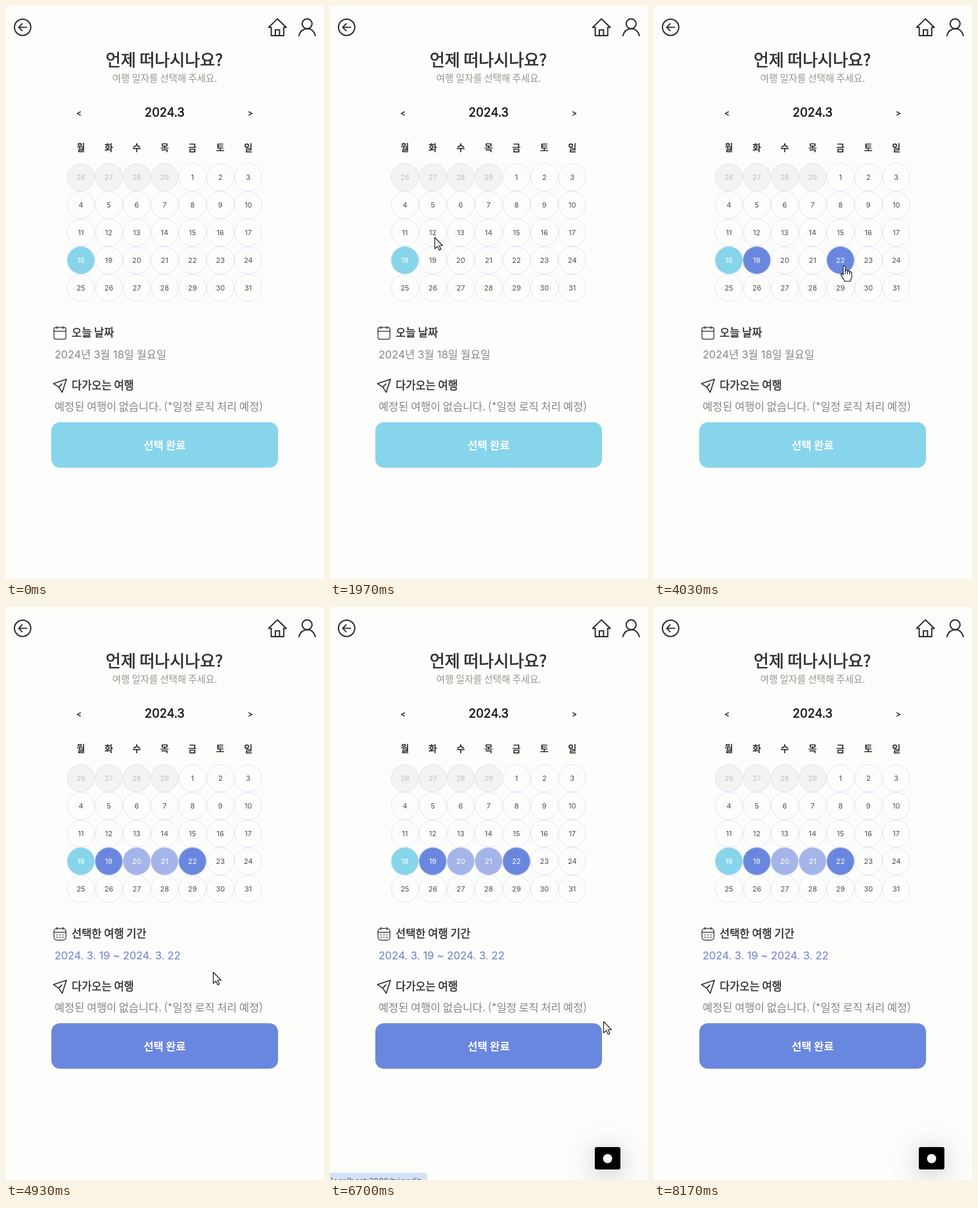
Recreate the animation shown at these times as an HTML page with a canvas. Size 484 by 870 pixels, loop 8210 ms.

```html
<!DOCTYPE html>
<html lang="ko">
<head>
<meta charset="utf-8">
<title>여행 일자 선택</title>
<style>
html, body { margin: 0; width: 100%; height: 100%; overflow: hidden; background: #fdfdfc; }
canvas { display: block; }
</style>
</head>
<body>
<canvas id="stage" width="484" height="870"></canvas>
<script>
const ctx = document.getElementById('stage').getContext('2d');
const LOOP = 8210;
const PICK_START = 2740, PICK_END = 3990, RANGE_SHOWN = 4080;
const BADGE_IN = 6230, STATUS_IN = 6350, STATUS_OUT = 7250;

const KR = '"Noto Sans CJK KR", "Noto Sans CJK", sans-serif';
const MIX = 'Inter, "Noto Sans CJK KR", "Noto Sans CJK", sans-serif';
const BG = '#fdfdfc', INK = '#2e2e2e', MUTED = '#868682';
const SKY = '#87d5eb', BLUE = '#6a87e0', RANGE = '#a4b5ea';

// Pointer stops: time, x, y
const path = [
  [450, 496, 452], [1300, 236, 372], [1970, 159, 351], [2600, 168, 390],
  [2950, 168, 390], [3800, 289, 394], [4250, 289, 394], [5450, 332, 661],
  [6300, 332, 661], [6700, 416, 629], [7250, 498, 596]
];

function text(str, x, y, size, color, weight = 400, font = KR, align = 'left') {
  const medium = weight === 500;
  ctx.font = `${medium ? 400 : weight} ${size}px ${font}`;
  ctx.fillStyle = ctx.strokeStyle = color;
  ctx.textAlign = align;
  ctx.fillText(str, x, y);
  // A thin outline turns the regular cut into a medium one
  if (medium) {
    ctx.lineWidth = size * 0.026;
    ctx.strokeText(str, x, y);
  }
}

function line(d, width = 2, color = INK) {
  ctx.strokeStyle = color;
  ctx.lineWidth = width;
  ctx.stroke(new Path2D(d));
}

function disc(x, y, r, fill, stroke, width = 1) {
  ctx.beginPath();
  ctx.arc(x, y, r, 0, Math.PI * 2);
  if (fill) { ctx.fillStyle = fill; ctx.fill(); }
  if (stroke) { ctx.strokeStyle = stroke; ctx.lineWidth = width; ctx.stroke(); }
}

function box(x, y, w, h, r, fill) {
  ctx.beginPath();
  ctx.roundRect(x, y, w, h, r);
  ctx.fillStyle = fill;
  ctx.fill();
}

const cellX = i => 114 + 42.45 * (i % 7);
const cellY = i => 260 + 42 * Math.floor(i / 7);

function header() {
  disc(25.3, 32.3, 12.4, null, INK, 2);
  line('M31.5 32.3H19.5M24.5 27L19.3 32.3L24.5 37.6', 1.8);
  line('M403.7 32.5H399.8L413 19.6L426.6 32.5H422.7V45H403.7V32.5M410 45V36.2H416.3V45', 2);
  disc(458.3, 27, 7.5, null, INK, 2);
  line('M445.8 45C447.5 38.5 452 34.8 458.3 34.5S469 38.5 470.8 45', 2);
  text('언제 떠나시나요?', 241, 91, 25, INK, 500, KR, 'center');
  text('여행 일자를 선택해 주세요.', 241.5, 115, 14.4, '#98988f', 400, KR, 'center');
  text('2024.3', 241.5, 168, 18.3, '#141414', 500, MIX, 'center');
  text('<', 111, 167, 12, '#141414', 500, MIX, 'center');
  text('>', 372, 167, 12, '#141414', 500, MIX, 'center');
  [...'월화수목금토일'].forEach((d, i) => text(d, cellX(i), 220, 14, '#141414', 500, KR, 'center'));
}

function cellStyle(day, t) {
  if (day < 1) return ['#f3f3f4', '#e3e3e6', '#c0c0c0'];
  if (day === 18) return [SKY, '#a9dff0', '#ffffff'];
  if (day === 19 && t >= PICK_START) return [BLUE, '#9db0ea', '#ffffff'];
  if (day === 22 && t >= PICK_END) return [BLUE, '#9db0ea', '#ffffff'];
  if ((day === 20 || day === 21) && t >= RANGE_SHOWN) return [RANGE, '#c3cef2', '#ffffff'];
  return [null, '#dfe7f8', '#505050'];
}

function calendar(t) {
  for (let i = 0; i < 35; i++) {
    const day = i - 3, x = cellX(i), y = cellY(i);
    const [fill, edge, ink] = cellStyle(day, t);
    disc(x, y, 20.7, fill, edge);
    text(day < 1 ? day + 29 : day, x, y + 4, 11, ink, 400, MIX, 'center');
  }
}

function calendarIcon(dotted) {
  ctx.beginPath();
  ctx.roundRect(73, 488.2, 18.2, 17.6, dotted ? 4.5 : 2.5);
  ctx.strokeStyle = INK;
  ctx.lineWidth = 1.2;
  ctx.stroke();
  line('M73 493.8H91.2M77.5 486.3V490M86.7 486.3V490', 1.2);
  if (!dotted) return;
  for (let i = 0; i < 6; i++) disc(77.6 + 4.5 * (i % 3), 497.8 + 3.7 * Math.floor(i / 3), 0.9, INK);
}

function details(t) {
  const picked = t >= RANGE_SHOWN;
  calendarIcon(picked);
  text(picked ? '선택한 여행 기간' : '오늘 날짜', 100, 502, 16.5, INK, 500);
  if (picked) text('2024. 3. 19 ~ 2024. 3. 22', 74, 535, 16.2, '#6a7fd8', 400, MIX);
  else text('2024년 3월 18일 월요일', 74, 535, 16.2, MUTED, 400, MIX);
  line('M92 566.8L72.3 573.3L80.3 578.6L85.6 586.6ZM80.3 578.6L85 573.9', 1.6);
  text('다가오는 여행', 100, 582, 16.5, INK, 500);
  text('예정된 여행이 없습니다. (*일정 로직 처리 예정)', 74, 614, 16.4, MUTED);
  box(69, 632, 345, 69, 13, picked ? BLUE : SKY);
  text('선택 완료', 241.5, 673, 16.4, '#ffffff', 700, KR, 'center');
}

function badge(t) {
  const k = Math.min(1, (t - BADGE_IN) / 160);
  if (k <= 0) return;
  ctx.save();
  ctx.globalAlpha = k;
  ctx.translate(0, 10 * (1 - k));
  ctx.shadowColor = 'rgba(0,0,0,0.26)';
  ctx.shadowBlur = 40;
  ctx.shadowOffsetY = 6;
  box(403, 820, 39, 34, 3, '#000000');
  ctx.shadowColor = 'transparent';
  disc(422.5, 837.5, 7, '#f6f6f6');
  ctx.restore();
}

function status(t) {
  const a = Math.min(1, (t - STATUS_IN) / 120, (STATUS_OUT - t) / 200);
  if (a <= 0) return;
  ctx.save();
  ctx.globalAlpha = a;
  box(-4, 859, 152, 22, 4, '#d4e3f8');
  text('localhost:3000/tripedit', 1, 876, 13, '#5c6068', 400, '"Noto Sans", sans-serif');
  ctx.restore();
}

function pointerAt(t) {
  const i = path.findIndex(p => p[0] > t);
  if (i < 1) return null;
  const [t0, x0, y0] = path[i - 1], [t1, x1, y1] = path[i];
  const u = (t - t0) / (t1 - t0), e = u * u * (3 - 2 * u);
  return [x0 + (x1 - x0) * e, y0 + (y1 - y0) * e];
}

function overTarget(x, y, t) {
  if (x > 69 && x < 414 && y > 632 && y < 701) return true;
  if (t < 2050) return false;
  for (let i = 4; i < 35; i++) {
    if (Math.hypot(x - cellX(i), y - cellY(i)) < 20.5) return true;
  }
  return false;
}

const ARROW = new Path2D('M0 0V17L4 13.3L6.7 19.2L9.3 18L6.7 12.3H12Z');
const HAND = new Path2D('M-1.5 1.5C-1.5 -.5 1.7 -.5 1.7 1.5V8C2 6.5 5 6.7 5 8.6C5.5 7.3 8.2 7.6 8.3 9.6C9 8.5 11.5 9 11.5 11V16C11.5 19 9.5 20 9.5 23.5H.5C.5 20.5 -5 16 -5 13.3C-5 11.3 -3 11.3 -1.5 14Z');

function pointer(t) {
  const p = pointerAt(t);
  if (!p) return;
  const hand = overTarget(p[0], p[1], t);
  ctx.save();
  ctx.translate(Math.round(p[0]) + 0.5, Math.round(p[1]) + 0.5);
  ctx.fillStyle = '#ffffff';
  ctx.strokeStyle = '#111111';
  ctx.lineWidth = 1.1;
  ctx.fill(hand ? HAND : ARROW);
  ctx.stroke(hand ? HAND : ARROW);
  if (hand) line('M1.7 8V12M5 9V12.5M8.3 10V13', 1, '#111111');
  ctx.restore();
}

function draw(t) {
  ctx.fillStyle = BG;
  ctx.fillRect(0, 0, 484, 870);
  ctx.lineJoin = ctx.lineCap = 'round';
  header();
  calendar(t);
  details(t);
  badge(t);
  status(t);
  pointer(t);
}

const start = performance.now();
function tick() {
  draw((performance.now() - start) % LOOP);
  requestAnimationFrame(tick);
}
tick();
</script>
</body>
</html>
```
